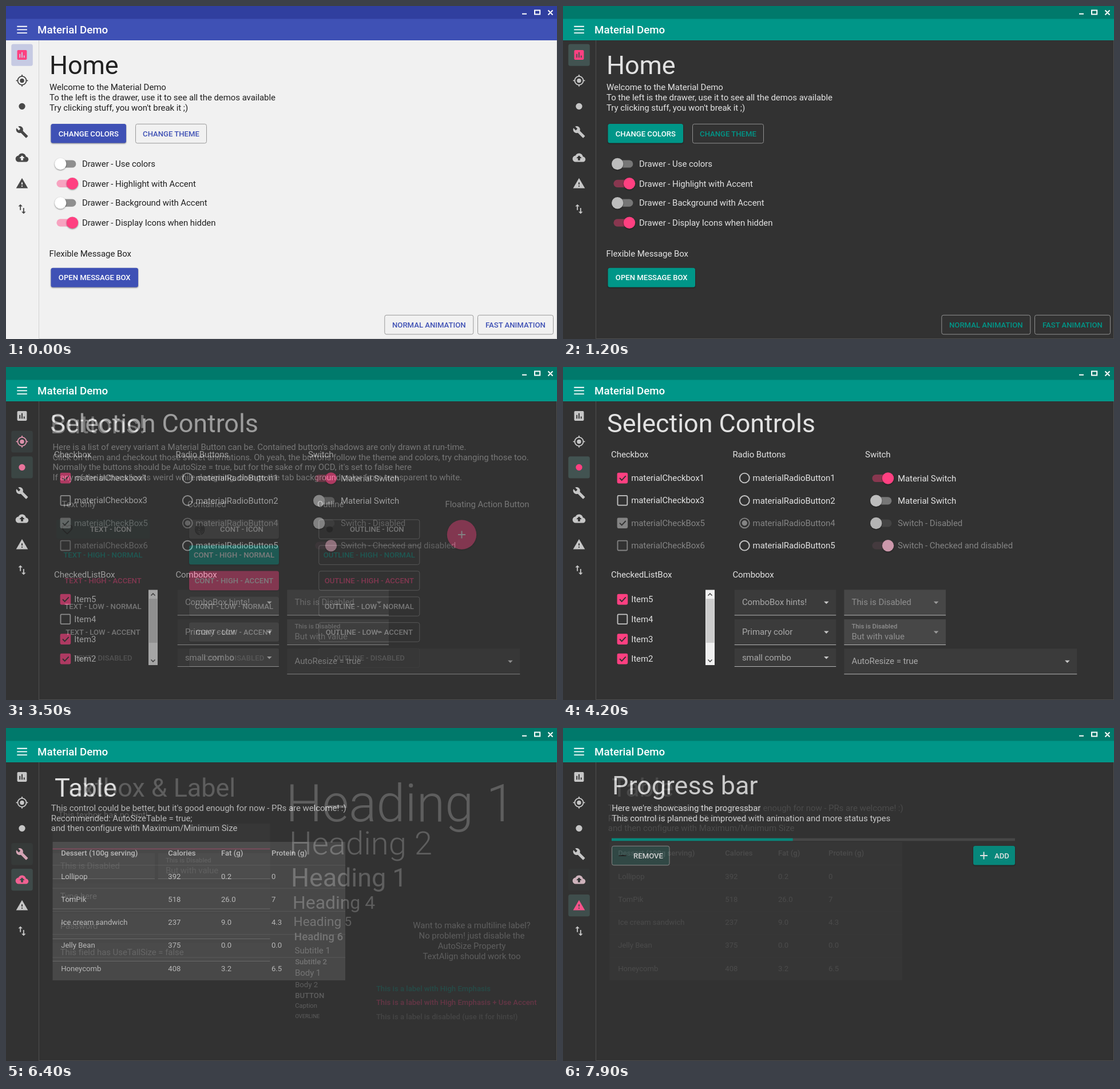
These frames come from a looping animation (963x582 px, 8 s). An HTML page:

```html
<!DOCTYPE html>
<html lang="en">
<head>
<meta charset="utf-8">
<title>Material Demo</title>
<style>
html, body { margin: 0; width: 100%; height: 100%; overflow: hidden; background: #323232; }
svg {
  position: absolute; left: 0; top: 0; width: 963px; height: 582px;
  font-family: Roboto, "Open Sans", sans-serif;
  --bg: #323232; --bar: #009688; --top: #00796b; --pink: #ff4081;
  --text: #e2e2e2; --icon: #c6c6c6; --line: #4e4e4e; --mark: #425351;
  --border: #909090; --track: #767676; --trackOn: #88374f; --thumb: #bdbdbd;
  --hint: #a9a9a9; --off: #848484; --low: #505050;
}
svg.light {
  --bg: #f1f1f1; --bar: #3f51b5; --top: #303f9f;
  --text: #212121; --icon: #484848; --line: #d2d2d2; --mark: #c6cae3;
  --border: #999; --track: #8f8f8f; --trackOn: #f7a3c0; --thumb: #fff;
}
text { white-space: pre; }
.raised { filter: drop-shadow(0 1px 1.3px rgba(0, 0, 0, .45)); }
</style>
</head>
<body>
<script>
const BODY = 15, SMALL = 13.125, TITLE = 45;
const GAP = { [BODY]: -0.065, [TITLE]: -0.09 };
const v = name => `var(--${name})`;

// Text is placed by the middle of its capital letters.
function text(x, cy, str, { size = BODY, weight = 400, fill = v('text'), anchor = 'start' } = {}) {
  const left = anchor === 'start' ? x + 0.6 : x;
  const safe = str.replace(/&/g, '&amp;');
  return `<text x="${left}" y="${(cy - 0.5 + size * 0.356).toFixed(2)}" font-size="${size}" font-weight="${weight}"
    fill="${fill}" text-anchor="${anchor}" letter-spacing="${GAP[size] || 0}">${safe}</text>`;
}
const lines = (x, cy, list, opt) => list.map((s, i) => text(x, cy + i * 17.8, s, opt)).join('');
const title = (x, cy, str) => text(x, cy, str, { size: TITLE });
const rect = (x, y, w, h, fill, extra = '') =>
  `<rect x="${x}" y="${y}" width="${w}" height="${h}" fill="${fill}" ${extra}/>`;
const circle = (x, y, r, fill, extra = '') =>
  `<circle cx="${x}" cy="${y}" r="${r}" fill="${fill}" ${extra}/>`;
const stroke = (d, color, w = 2) => `<path d="${d}" fill="none" stroke="${color}" stroke-width="${w}"/>`;
const icon = (d, cx, cy, fill) =>
  `<path transform="translate(${cx - 11.25} ${cy - 11.25}) scale(.9375)" d="${d}" fill="${fill}"/>`;
const plus = (x, y, color) => stroke(`M${x - 6.5} ${y}h13M${x} ${y - 6.5}v13`, color, 1.9);

const DOT = 'M12 6a6 6 0 1 0 .01 0z';
const HEART = 'M16.5 3c-1.74 0-3.41.81-4.5 2.09C10.91 3.81 9.24 3 7.5 3 4.42 3 2 5.42 2 8.5c0 3.78 3.4 6.86 8.55 11.54L12 21.35l1.45-1.32C18.6 15.36 22 12.28 22 8.5 22 5.42 19.58 3 16.5 3zm-4.4 15.55l-.1.1-.1-.1C7.14 14.24 4 11.39 4 8.5 4 6.5 5.5 5 7.5 5c1.54 0 3.04.99 3.57 2.36h1.87C13.46 5.99 14.96 5 16.5 5c2 0 3.5 1.5 3.5 3.5 0 2.89-3.14 5.74-7.9 10.05z';
const DRAWER = [
  'M19 3H5c-1.1 0-2 .9-2 2v14c0 1.1.9 2 2 2h14c1.1 0 2-.9 2-2V5c0-1.1-.9-2-2-2zM9 17H7v-7h2v7zm4 0h-2V7h2v10zm4 0h-2v-4h2v4z',
  'M12 8a4 4 0 1 0 0 8 4 4 0 0 0 0-8zm8.94 3A9 9 0 0 0 13 3.06V1h-2v2.06A9 9 0 0 0 3.06 11H1v2h2.06A9 9 0 0 0 11 20.94V23h2v-2.06A9 9 0 0 0 20.94 13H23v-2h-2.06zM12 19a7 7 0 1 1 0-14 7 7 0 0 1 0 14z',
  DOT,
  'M22.7 19l-9.1-9.1c.9-2.3.4-5-1.5-6.9-2-2-5-2.4-7.4-1.3L9 6 6 9 1.6 4.7C.4 7.1.9 10.1 2.9 12.1c1.9 1.9 4.6 2.4 6.9 1.5l9.1 9.1c.4.4 1 .4 1.4 0l2.3-2.3c.5-.4.5-1.1.1-1.4z',
  'M19.35 10.04C18.67 6.59 15.64 4 12 4 9.11 4 6.6 5.64 5.35 8.04 2.34 8.36 0 10.91 0 14c0 3.31 2.69 6 6 6h13c2.76 0 5-2.24 5-5 0-2.64-2.05-4.78-4.65-4.96zM14 13v4h-4v-4H7l5-5 5 5h-3z',
  'M1 21h22L12 2 1 21zm12-3h-2v-2h2v2zm0-4h-2v-4h2v4z',
  'M9 3L5 6.99h3V14h2V6.99h3L9 3zm7 14.01V10h-2v7.01h-3L15 21l4-3.99h-3z'
];

function frame(active) {
  const items = DRAWER.map((d, i) => {
    const cy = 85.5 + i * 44.9, on = i === active;
    return (on ? rect(9.3, cy - 19, 37.5, 38.2, v('mark'), 'rx="3.5"') : '') +
      icon(d, 28, cy, v(on ? 'pink' : 'icon'));
  }).join('');
  return rect(0, 0, 963, 582, v('bg')) +
    rect(0, 22, 963, 38, v('bar')) + rect(0, 0, 963, 22.5, v('top')) +
    stroke('M902 13.7h8M924 7.5h9.2v7h-9.2zM947.5 7.5l8 8m0-8l-8 8', '#fff', 2) +
    stroke('M19.3 35.8h17.6m-17.6 5.6h17.6m-17.6 5.7h17.6', '#fff', 1.9) +
    text(54.5, 41.6, 'Material Demo', { size: 18.75, weight: 500, fill: '#fff' }) +
    stroke('M57.5 60v521.5H962.5V60', v('line'), 1) + items;
}

const label = (cx, cy, str, fill) => text(cx, cy, str, { size: SMALL, weight: 500, anchor: 'middle', fill });
function solid(x, y, w, str, fill = v('bar'), ink = '#fff', dx = 0) {
  return rect(x, y, w, 33.6, fill, 'rx="3.5" class="raised"') + label(x + w / 2 + dx, y + 17.4, str, ink);
}
function outline(x, y, w, str, ink = v('bar'), border = v('border'), dx = 0, fill = 'none') {
  return rect(x, y, w, 33.5, fill, `rx="3.2" stroke="${border}"`) + label(x + w / 2 + dx, y + 17.2, str, ink);
}

function toggle(x, cy, on, str, { thumb = on ? v('pink') : v('thumb'), ink, track = v(on ? 'trackOn' : 'track') } = {}) {
  return rect(x, cy - 6.6, 34, 13.2, track, 'rx="6.6"') +
    circle(x + (on ? 27.6 : 6.8), cy, 10.2, thumb, 'class="raised"') +
    text(x + 44, cy + .4, str, { fill: ink || v('text') });
}

function check(cy, on, str, off) {
  const edge = off ? v('off') : on ? v('pink') : v('icon');
  return rect(95.5, cy - 8.3, 16.8, 16.8, on ? edge : 'none', `rx="1.5" stroke="${edge}" stroke-width="1.8"`) +
    (on ? stroke(`M99 ${cy}l3.7 3.8 7-7.4`, v('bg'), 1.9) : '') +
    text(118.6, cy + .4, str, { fill: off ? v('off') : v('text') });
}

function radio(cy, on, str, off) {
  const color = off ? v('off') : v('icon');
  return circle(317.3, cy, 8.4, 'none', `stroke="${color}" stroke-width="1.9"`) +
    (on ? circle(317.3, cy, 4.7, color) : '') +
    text(331, cy + .4, str, { fill: off ? v('off') : v('text') });
}

function field(x, y, w, h, str, { off, hint, value, focus } = {}) {
  const fill = off || focus ? '#474747' : '#3b3b3b';
  const ink = off ? '#8f8f8f' : v('hint');
  return rect(x, y, w, h, fill) +
    (focus ? rect(x, y + h - 1.8, w, 1.9, v('pink')) : rect(x, y + h - 1, w, 1, '#b4b4b4')) +
    (hint ? text(x + 12.6, y + 12.3, hint, { size: 11.25, weight: 500, fill: ink }) + text(x + 12.6, y + 30.3, value, { fill: ink })
          : text(x + 12.6, y + h / 2 - .2, str, { fill: ink }));
}
function combo(x, y, w, h, str, opt = {}) {
  const ax = x + w - 17, ay = y + h / 2 - 1;
  return field(x, y, w, h, str, opt) +
    `<path d="M${ax - 4.2} ${ay - 1}h8.6l-4.3 4.5z" fill="${opt.off ? '#9a9a9a' : v('icon')}"/>`;
}

const home = () => frame(0) + title(75.3, 103.5, 'Home') +
  lines(75.4, 142.5, ['Welcome to the Material Demo',
    'To the left is the drawer, use it to see all the demos available',
    "Try clicking stuff, you won't break it ;)"]) +
  solid(78.5, 206, 131.5, 'CHANGE COLORS') + outline(226.5, 206.3, 124, 'CHANGE THEME') +
  toggle(88.4, 276, false, 'Drawer - Use colors') +
  toggle(88.4, 310.3, true, 'Drawer - Highlight with Accent') +
  toggle(88.4, 344.2, false, 'Drawer - Background with Accent') +
  toggle(88.4, 378.8, true, 'Drawer - Display Icons when hidden') +
  text(75, 432.8, 'Flexible Message Box') + solid(78.5, 457.8, 152.5, 'OPEN MESSAGE BOX') +
  outline(661.8, 540.3, 155, 'NORMAL ANIMATION') + outline(824.5, 540.3, 132, 'FAST ANIMATION');

function fingerprint(cx, cy, color) {
  return [2, 4.4, 6.8, 9.2].map((r, i) =>
    `<ellipse cx="${cx}" cy="${cy}" rx="${r * .85}" ry="${r}" fill="none" stroke="${color}"
      stroke-width="1.3" stroke-dasharray="${r * 2.2} 1.6" stroke-dashoffset="${i * 3}"/>`).join('');
}

function buttons() {
  const rows = [
    ['ICON', v('text'), v('low')],
    ['HIGH - NORMAL', v('bar'), v('bar')],
    ['HIGH - ACCENT', v('pink'), v('pink')],
    ['LOW - NORMAL', v('text'), v('low')],
    ['LOW - ACCENT', v('text'), v('low')],
    ['DISABLED', v('off'), '#464646']
  ];
  const dark = '#161616';
  const grid = rows.map(([name, ink, fill], i) => {
    const y = 266.7 + i * 44.95, dx = i ? 0 : 13.5, off = i === 5;
    return label(169.5 + dx, y + 17.4, 'TEXT - ' + name, ink) +
      solid(320, y, 157, 'CONT - ' + name, fill, off ? v('off') : '#f0f0f0', dx) +
      outline(546.8, y + .2, 176, 'OUTLINE - ' + name, ink, off ? '#424242' : v('border'), dx);
  }).join('');
  return frame(1) + title(77, 100, 'Buttons!') +
    lines(80.8, 140, ["Here is a list of every variant a Material Button can be. Contained button's shadows are only drawn at run-time.",
      'Click on them and checkout those sweet animations. Oh yeah, the buttons follow the theme and colors, try changing those too.',
      "Normally the buttons should be AutoSize = true, but for the sake of my OCD, it's set to false here",
      'If any of the buttons looks weird while designing, change the tab background color from transparent to white.']) +
    text(97, 240, 'Text only') + text(316.7, 240, 'Contained') +
    text(543.3, 240, 'Outline') + text(766.9, 240, 'Floating Action Button') +
    rect(88, 266.7, 163.5, 33.6, '#2d3b39', 'rx="3.5"') + grid +
    icon(HEART, 107, 284, dark) + fingerprint(338.7, 283.7, dark) + icon(DOT, 565.5, 283.5, dark) +
    circle(796.5, 293, 25.7, v('pink'), 'class="raised"') + plus(796.5, 293, '#fff');
}

const selection = () => frame(2) + title(76.5, 98.5, 'Selection Controls') +
  text(83.4, 153, 'Checkbox') + text(295.8, 153, 'Radio Buttons') + text(527.5, 153, 'Switch') +
  check(194, true, 'materialCheckbox1') + check(233.2, false, 'materialCheckbox3') +
  check(272.6, true, 'materialCheckBox5', true) + check(312, false, 'materialCheckBox6', true) +
  radio(194, false, 'materialRadioButton1') + radio(233.4, false, 'materialRadioButton2') +
  radio(272.8, true, 'materialRadioButton4', true) + radio(312.2, false, 'materialRadioButton5') +
  toggle(540.4, 194.5, true, 'Material Switch') + toggle(540.4, 233.8, false, 'Material Switch') +
  toggle(540.4, 273, false, 'Switch - Disabled', { thumb: '#b4b4b4', track: '#444', ink: v('off') }) +
  toggle(540.4, 312.2, true, 'Switch - Checked and disabled', { thumb: '#cc98ab', track: '#443a3e', ink: v('off') }) +
  text(83.4, 363.5, 'CheckedListBox') + text(295.8, 363.5, 'Combobox') +
  check(406, true, 'Item5') + check(440.7, false, 'Item4') + check(475.5, true, 'Item3') + check(510, true, 'Item2') +
  rect(249, 389.5, 16, 131.5, '#f0f0f0') + rect(249.8, 405, 14.6, 77, '#cdcdcd') +
  stroke('M253.5 399.5l3.5-3.5 3.5 3.5m-7 112l3.5 3.5 3.5-3.5', '#505050', 1.6) +
  combo(299.7, 389.3, 177.5, 45, 'ComboBox hints!') + combo(299.7, 441, 177.5, 45, 'Primary color') +
  combo(299.7, 491.8, 177.5, 32.2, 'small combo') +
  combo(491.3, 389.3, 177.7, 45, 'This is Disabled', { off: true }) +
  combo(491.3, 441, 177.7, 45, '', { off: true, hint: 'This is Disabled', value: 'But with value' }) +
  combo(491.3, 492.2, 407, 45, 'AutoResize = true');

function fields() {
  // x, middle, size, weight, caption
  const scale = [
    [488.5, 131, 90, 300, 'Heading 1'], [494.3, 201, 56.25, 300, 'Heading 2'],
    [497.3, 261, TITLE, 400, 'Heading 1'], [500.4, 305.5, 31.9, 400, 'Heading 4'],
    [502, 338.7, 22.5, 400, 'Heading 5'], [503.2, 365.3, 18.75, 500, 'Heading 6'],
    [504, 388.7, BODY, 400, 'Subtitle 1'], [504.6, 409, SMALL, 500, 'Subtitle 2'],
    [504.4, 428, BODY, 400, 'Body 1'], [504.6, 448.5, SMALL, 400, 'Body 2'],
    [504.6, 468, SMALL, 500, 'BUTTON'], [504.6, 485.5, 11.25, 400, 'Caption'],
    [504.8, 504, 9.4, 400, 'OVERLINE']
  ].map(([x, cy, size, weight, s]) => text(x, cy, s, { size, weight })).join('');
  const note = (cy, s, fill) => text(646.3, cy, s, { size: SMALL, weight: 500, fill });
  return frame(3) + title(84.3, 104, 'Textbox & Label') + text(90.6, 152, 'This texbox has no hint!') +
    field(81.5, 167, 380, 45.2, '', { focus: true }) +
    field(81.5, 219, 178.5, 45, 'This is Disabled', { off: true }) +
    field(265.7, 219, 195.8, 45, '', { off: true, hint: 'This is Disabled', value: 'But with value' }) +
    field(81.5, 271.5, 380, 45, 'Type here') + field(81.5, 324, 380, 45, 'Password') +
    field(81.5, 376, 380, 32, 'This field has UseTallSize = false') + scale +
    lines(814, 345.5, ['Want to make a multiline label?', 'No problem! just disable the',
      'AutoSize Property', 'TextAlign should work too'], { anchor: 'middle' }) +
    note(455.7, 'This is a label with High Emphasis', v('bar')) +
    note(480.2, 'This is a label with High Emphasis + Use Accent', v('pink')) +
    note(505.3, 'This is a label is disabled (use it for hints!)', '#7e7e7e');
}

function table() {
  const cols = [95.6, 282.7, 375.4, 463.4];
  const data = [
    'Dessert (100g serving)|Calories|Fat (g)|Protein (g)', 'Lollipop|392|0.2|0', 'TomPik|518|26.0|7',
    'Ice cream sandwich|237|9.0|4.3', 'Jelly Bean|375|0.0|0.0', 'Honeycomb|408|3.2|6.5'
  ];
  const rows = data.map((row, i) =>
    (i ? rect(81.5, 199 + i * 40.3, 511.5, 1, '#646464') : '') +
    row.split('|').map((s, c) => text(cols[c], 219.2 + i * 40.25, s, { size: SMALL, weight: i ? 400 : 500 })).join('')).join('');
  return frame(4) + title(84.3, 104, 'Table') +
    lines(78.2, 140, ["This control could be better, but it's good enough for now - PRs are welcome! :)",
      'Recommended: AutoSizeTable = true;', 'and then configure with Maximum/Minimum Size']) +
    rect(81.5, 199, 511.5, 242, v('low')) + rows;
}

const progress = () => frame(5) + title(85.5, 100.5, 'Progress bar') +
  lines(84.6, 140, ["Here we're showcasing the progressbar",
    'This control is planned be improved with animation and more status types']) +
  rect(85, 192.7, 705, 4.6, '#4b4b4b') + rect(85, 192.7, 316.7, 4.6, v('bar')) +
  outline(85.5, 206.3, 100.5, 'REMOVE', v('text'), v('border'), 13.3, '#2d4744') + stroke('M97.5 223h13', '#161616', 1.9) +
  solid(717, 206, 73, 'ADD', v('bar'), '#fff', 13.5) + plus(735.5, 223, '#fff');

const pages = [home, home, buttons, selection, fields, table, progress];
document.body.innerHTML = pages.map((page, i) =>
  `<svg viewBox="0 0 963 582" class="${i ? 'dark' : 'light'}">${page()}</svg>`).join('');
const layers = [...document.querySelectorAll('svg')];

const LOOP = 8000, FIRST = 500, PERIOD = 1400, STEP = 100, STEPS = 8;

// Pages fade in by eight steps that ease out.
function shown(time) {
  const step = Math.floor(time / STEP) + 1;
  const x = Math.min(1, Math.max(0, step / STEPS));
  return 1 - (1 - x) ** 2;
}

function draw() {
  const t = performance.now() % LOOP;
  layers.forEach((layer, i) => {
    const a = i ? shown(t - FIRST - (i - 1) * PERIOD) : 1;
    layer.style.opacity = a;
    layer.style.visibility = a ? 'visible' : 'hidden';
  });
  requestAnimationFrame(draw);
}
draw();
</script>
</body>
</html>
```
